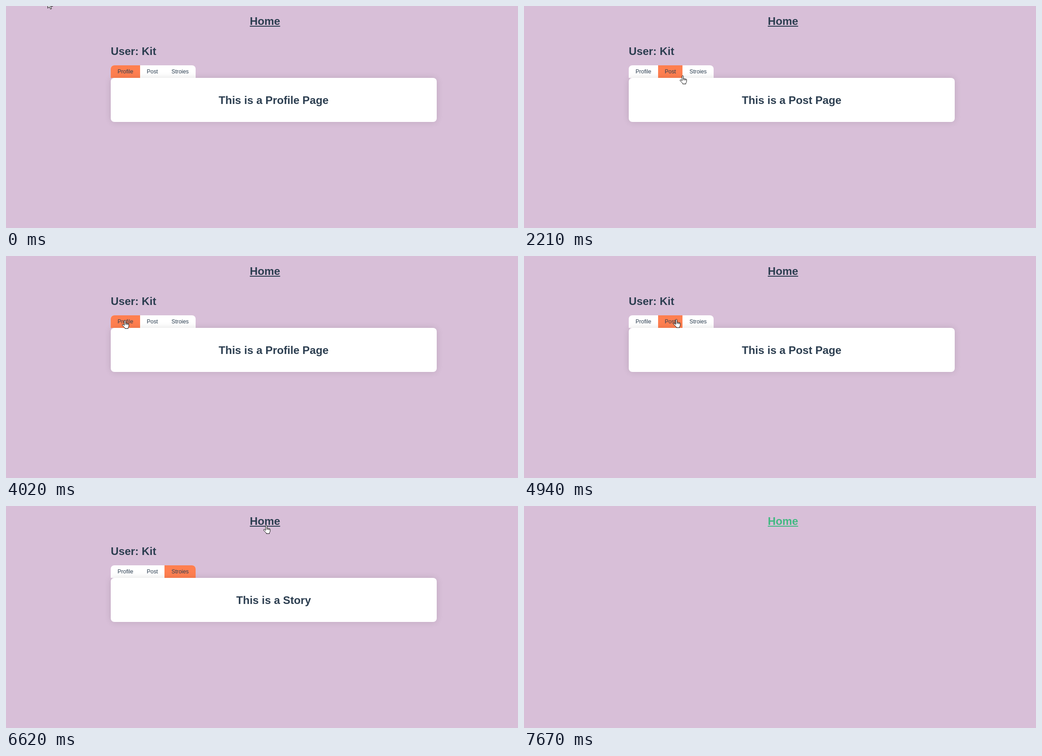
Recreate the animation shown at these times as an HTML page. Size 1134x494 px, loop 8 s.

```html
<!DOCTYPE html>
<html lang="en">
<head>
<meta charset="utf-8">
<title>Tabs</title>
<style>
  html, body { margin: 0; width: 100%; height: 100%; overflow: hidden; background: #d8bfd8; }
  body { font: bold 24.2px/27px "Liberation Sans", Arial, sans-serif; color: #2c3e50; }
  body > *, #page > * { position: absolute; white-space: nowrap; }
  #home { left: 540px; top: 20px; text-decoration: underline 2px; text-underline-offset: 2px; }
  #home.current { color: #42b983; }
  #page { left: 232px; top: 87px; }
  .tabs { top: 45px; display: flex; background: #fff; border-radius: 8px 8px 0 0; overflow: hidden; }
  .tabs span { padding: 0 15px; font: 12.3px/28px "Liberation Sans", Arial, sans-serif; }
  .tabs .active { background: #ff7f50; }
  .card { top: 73px; width: 721.5px; height: 62px; padding-top: 36px; text-align: center;
    background: #fff; border-radius: 8px; box-shadow: 0 0 15px rgba(0, 0, 0, .12); }
  #cursor { left: 0; top: 0; overflow: visible; pointer-events: none;
    fill: #fff; stroke: #000; stroke-linejoin: round; }
</style>
</head>
<body>
<div id="home" class="link">Home</div>
<div id="page">
  <div>User: Kit</div>
  <div class="tabs">
    <span class="link">Profile</span><span class="link">Post</span><span class="link">Stroies</span>
  </div>
  <div class="card"></div>
</div>
<svg id="cursor" width="1" height="1">
  <path id="arrow" d="M.5 .5V16l3.6-3.4L6.5 18l2.4-1-2.3-5.2h5z"/>
  <path id="hand" transform="translate(.5 -.5)" d="M-1.5 12V2a1.5 1.5 0 0 1 3 0V7.2q1.3-1.2 2.5 .4 1.4-1 2.4 .6 2.2-.6 2.2 1.6V13q0 2-1.6 4v2h-7v-1.5L-5.6 12q-1-1.7 .6-2.4 1.4-.3 3.5 2.4zM1.5 7v3.5M4 7.8v3M6.4 8.4v2.6"/>
</svg>
<script>
const LOOP = 8000, FRAME = 200 / 3, GO_HOME = 6755, HIDE_CURSOR = 7665;
const titles = ["This is a Profile Page", "This is a Post Page", "This is a Story"];

// [time, tab index]
const clicks = [[0, 0], [1630, 1], [2880, 2], [3890, 0], [4880, 1], [5620, 2]];

// [start time, end time, x, y] of each pointer move
const moves = [
  [0, 960, 306, 155], [1060, 1360, 314, 149], [1630, 2600, 365, 157],
  [2880, 3690, 263, 143], [4420, 5550, 387, 140], [5620, 5870, 495, 152],
  [5870, 6290, 576, 43], [6755, 7150, 549, 79], [7500, 7700, 466, 95]
];

const find = selector => document.querySelector(selector);
const show = (selector, on) => find(selector).style.visibility = on ? "visible" : "hidden";
const easeOut = k => 1 - (1 - k) ** 1.5;

function pointer(t) {
  let x = 92, y = -11;
  for (const [start, end, toX, toY] of moves) {
    const k = easeOut(Math.min(1, Math.max(0, (t - start) / (end - start))));
    x += (toX - x) * k;
    y += (toY - y) * k;
  }
  return [Math.round(x), Math.round(y)];
}

function draw(t) {
  const current = clicks.findLast(([time]) => time <= t)[1];
  document.querySelectorAll(".tabs span").forEach((tab, i) =>
    tab.classList.toggle("active", i === current));
  find(".card").textContent = titles[current];

  const atHome = t >= GO_HOME;
  show("#page", !atHome);
  find("#home").classList.toggle("current", atHome);

  // The pointer moves in steps of one frame
  const [x, y] = pointer(Math.floor(t / FRAME) * FRAME);
  const overLink = Boolean(document.elementFromPoint(x, y)?.closest(".link"));
  const visible = t < HIDE_CURSOR;
  show("#hand", visible && overLink);
  show("#arrow", visible && !overLink);
  find("#cursor").style.transform = `translate(${x}px, ${y}px)`;
}

function tick() {
  draw(performance.now() % LOOP);
  requestAnimationFrame(tick);
}
tick();
</script>
</body>
</html>
```
